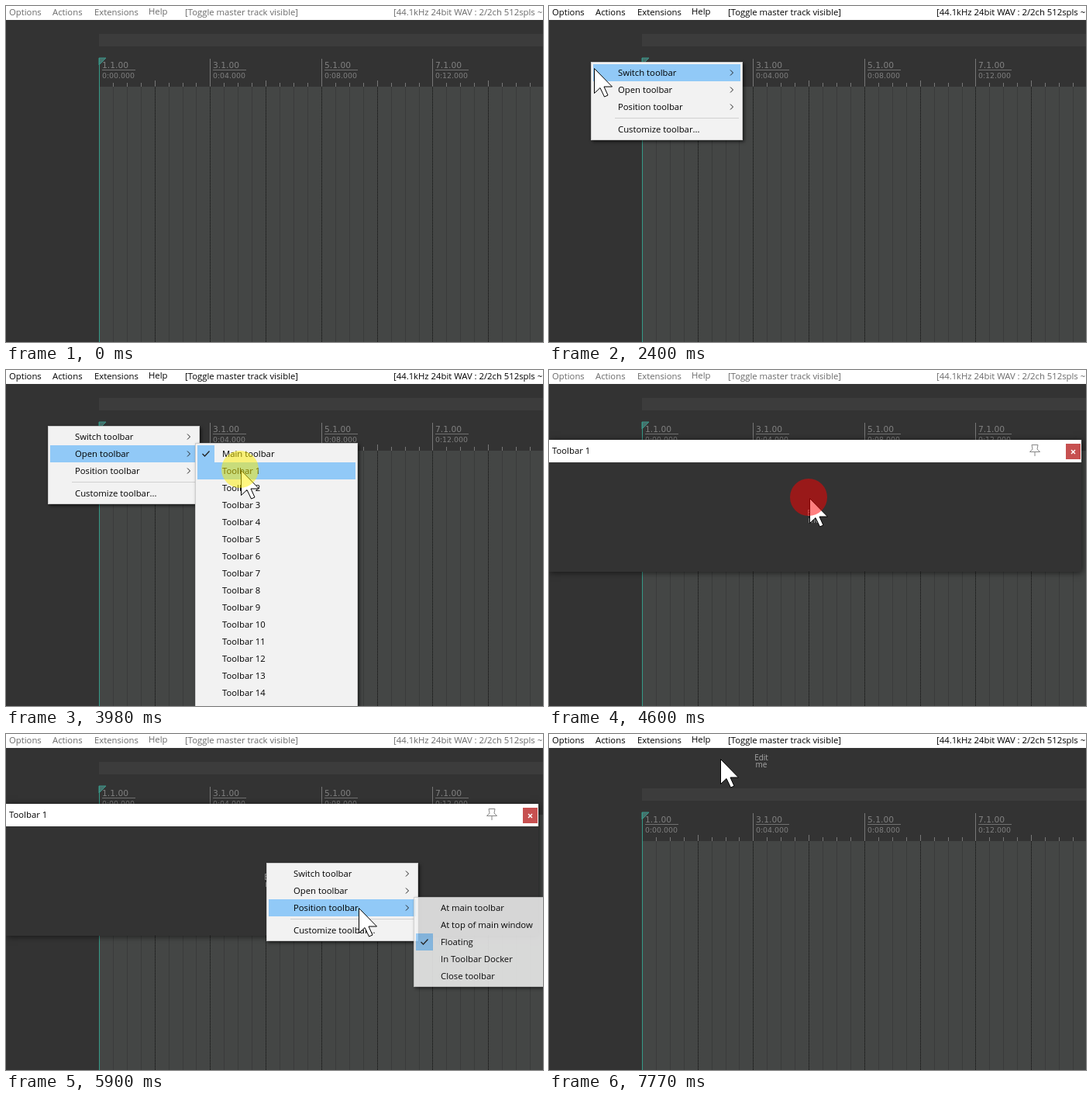
Animation of 693x433 px, one loop 8000 ms. Source, as an HTML page with a canvas:

```html
<!DOCTYPE html>
<html lang="en">
<head>
<meta charset="utf-8">
<title>Toolbar docking</title>
<style>
html, body { margin: 0; width: 100%; height: 100%; overflow: hidden; background: #333; }
canvas { display: block; }
</style>
</head>
<body>
<canvas id="stage" width="693" height="433"></canvas>
<script>
const W = 693, H = 433, LOOP = 8000, STEP = 70;
const layer = Object.assign(document.createElement('canvas'), { width: W, height: H });
let c = document.getElementById('stage').getContext('2d');

const RESTARTS = [0, 190, 1840, 3150, 3980, 4320, 5080, 5760, 7140];

// Pointer moves: start, end, target x, y and an optional curve control point.
const START = [700, 395];
const MOVES = [
  [120, 1380, 55, 73, 356, -165],
  [2260, 2890, 115, 111, 85, 150],
  [3150, 3780, 303, 129],
  [4250, 4600, 336, 165],
  [5060, 5500, 455, 224],
  [5830, 6670, 597, 247],
  [7070, 7770, 221, 32]
];

const RED = 'rgba(255,0,0,.5)', YELLOW = 'rgba(255,240,0,.5)';
const CLICKS = [[1840, 1980, RED], [3980, 4050, YELLOW], [4600, 4740, RED], [6740, 6880, YELLOW]];

const UI_FONT = '"Open Sans", "Noto Sans", sans-serif';
const RULER_FONT = '"DejaVu Sans", sans-serif';

const MAIN_ITEMS = ['Switch toolbar', 'Open toolbar', 'Position toolbar'];
const OPEN_ITEMS = ['Main toolbar', ...Array.from({ length: 16 }, (_, i) => 'Toolbar ' + (i + 1))];
const POSITION_ITEMS = ['At main toolbar', 'At top of main window', 'Floating', 'In Toolbar Docker', 'Close toolbar'];

const ARROW = [[0, 0], [0, 32], [7.5, 25], [13, 36.5], [17.5, 34.5], [12.5, 23.5], [23, 23.5]];

const ease = u => u < .5 ? 4 * u ** 3 : 1 - 4 * (1 - u) ** 3;
const between = (t, a, b) => t >= a && t < b;
const fade = (t, start) => Math.min(1, .28 + (t - start) * .0041);

function rect(x, y, w, h, color) {
  c.fillStyle = color;
  c.fillRect(x, y, w, h);
}

function text(s, x, y, color = '#000', size = 11.3, font = UI_FONT) {
  c.font = size + 'px ' + font;
  c.fillStyle = color;
  c.fillText(s, x, y);
}

function path(points, { fill, stroke, width = 1, close = false }) {
  c.beginPath();
  points.forEach(p => c.lineTo(...p));
  if (close) c.closePath();
  if (fill) { c.fillStyle = fill; c.fill(); }
  if (stroke) { c.strokeStyle = stroke; c.lineWidth = width; c.stroke(); }
}

function shadowed(blur, offset, draw) {
  c.save();
  c.shadowColor = 'rgba(0,0,0,.6)';
  c.shadowBlur = blur;
  c.shadowOffsetX = c.shadowOffsetY = offset;
  draw();
  c.restore();
}

// Draws a group on its own layer, then blends it in as one piece.
function faded(alpha, draw) {
  const under = c;
  c = layer.getContext('2d');
  c.clearRect(0, 0, W, H);
  draw();
  c = under;
  c.globalAlpha = alpha;
  c.drawImage(layer, 0, 0);
  c.globalAlpha = 1;
}

function stepTime(t) {
  const s = RESTARTS.findLast(r => r <= t);
  return s + Math.floor((t - s) / STEP) * STEP;
}

function pointerAt(t) {
  let [x, y] = START;
  for (const [a, b, tx, ty, cx = (x + tx) / 2, cy = (y + ty) / 2] of MOVES) {
    if (t <= a) break;
    const u = ease(Math.min(1, (t - a) / (b - a))), v = 1 - u;
    x = v * v * x + 2 * u * v * cx + u * u * tx;
    y = v * v * y + 2 * u * v * cy + u * u * ty;
  }
  return [Math.round(x), Math.round(y)];
}

function menuBar(t, active) {
  const ink = active ? '#000' : '#6a6a6a';
  rect(0, 0, W, 18, '#fff');
  text('Options', 4, 12, ink);
  text('Actions', 60, 12, ink);
  text('Extensions', 114, 12, ink);
  text('Help', 184, 11, ink);
  text('[Toggle master track visible]', 231, 12, ink);
  if (between(t, 1840, 2260)) text('[audio', 659, 12, ink);
  else text('[44.1kHz 24bit WAV : 2/2ch 512spls ~', 500, 12, ink);
}

function timeline(dy) {
  const top = 104 + dy;
  rect(0, 18, W, H, '#333');
  rect(120, 36 + dy, W, 16, '#3c3c3c');
  rect(120, top, W, H, '#444645');
  for (let beat = 0; beat < 32; beat++) {
    const x = Math.floor(120.4 + beat * 17.94), bar = beat / 4;
    if (beat % 4) {
      rect(x, top, 1, H, '#3a3b3b');
      rect(x, top - 5, 1, 5, '#777');
      continue;
    }
    for (let y = top; y < H; y += 2) rect(x, y, 1, 1, '#0c0c0c');
    const tall = bar % 2 ? 8 : 36;
    rect(x, top - tall, 1, tall, '#777');
    if (bar % 2) continue;
    text(bar + 1 + '.1.00', x + 4, 80 + dy, '#808080', 10.7, RULER_FONT);
    rect(x + 4, 82 + dy, 43, 1, '#707070');
    text('0:' + String(bar * 2).padStart(2, '0') + '.000', x + 4, 93 + dy, '#808080', 9.4, RULER_FONT);
  }
  path([[120, 67 + dy], [129, 67 + dy], [120, 76 + dy]], { fill: '#45706b', stroke: '#3a9488', close: true });
  rect(120, 67 + dy, 1, H, '#359a88');
}

function editMe(x, y) {
  c.textAlign = 'center';
  text('Edit', x, y, '#a8a8a8', 10);
  text('me', x, y + 9, '#a8a8a8', 10);
  c.textAlign = 'left';
}

function floatingWindow() {
  shadowed(8, 1, () => rect(0, 90, 687, 170, '#333'));
  rect(0, 90, 687, 29, '#fff');
  text('Toolbar 1', 4, 108);
  path([[623, 96.5], [631, 96.5], [630, 102], [633.5, 105.5], [620.5, 105.5], [624, 102]],
    { stroke: '#888', close: true });
  path([[627, 106], [627, 111]], { stroke: '#888' });
  rect(667, 95, 19, 20, '#c75050');
  path([[674, 103], [679, 108]], { stroke: '#fff', width: 1.4 });
  path([[679, 103], [674, 108]], { stroke: '#fff', width: 1.4 });
  editMe(342, 188);
}

function menu(x, y, w, h, items, { row, checked, more }) {
  shadowed(4, 2, () => rect(x, y, w, h, '#f2f2f2'));
  c.strokeStyle = '#ccc';
  c.lineWidth = 1;
  c.strokeRect(x + .5, y + .5, w - 1, h - 1);
  items.forEach((label, i) => {
    const ry = y + 3 + i * 22;
    if (i === row) rect(x + 3, ry, w - 6, 22, '#91c9f7');
    if (i === checked) {
      rect(x + 3, ry, 22, 22, '#91c9f7');
      path([[x + 9.5, ry + 11], [x + 12.5, ry + 14], [x + 18.5, ry + 7.5]], { stroke: '#222', width: 1.3 });
    }
    text(label, x + 35, ry + 15);
    if (more) path([[x + 180, ry + 7.5], [x + 183.5, ry + 11], [x + 180, ry + 14.5]], { stroke: '#222' });
  });
  if (more) {
    rect(x + 31, y + 72, 160, 1, '#d0d0d0');
    text('Customize toolbar...', x + 35, y + 91);
  }
}

// Row under the pointer, or -1 outside the list.
function rowAt([px, py], x, y, w, count) {
  const i = Math.floor((py - y - 3) / 22);
  return px > x + 3 && px < x + w - 3 && i >= 0 && i < count ? i : -1;
}

function contextMenu(t, pointer, x, y, opened, subOpened, parent, sub) {
  if (t < opened) return;
  const expanded = t >= subOpened;
  const row = expanded ? parent : rowAt(pointer, x, y, 196, MAIN_ITEMS.length);
  faded(fade(t, opened), () => menu(x, y, 196, 101, MAIN_ITEMS, { row, more: true }));
  if (!expanded) return;
  const { items, checked } = sub;
  const subRow = rowAt(pointer, sub.x, sub.y, sub.w, items.length);
  faded(fade(t, subOpened), () =>
    menu(sub.x, sub.y, sub.w, items.length * 22 + 6, items, { row: subRow, checked }));
}

function drawPointer(t, [x, y]) {
  path(ARROW.map(([ax, ay]) => [x + ax + .5, y + ay + .5]), { fill: '#fff', stroke: '#000', close: true });
  const click = CLICKS.find(([a, b]) => between(t, a, b));
  if (!click) return;
  c.fillStyle = click[2];
  c.beginPath();
  c.arc(x - 1, y - 1, 24, 0, 7);
  c.fill();
}

function draw(t) {
  const docked = t >= 6880, floating = between(t, 4050, 6880);
  const pointer = pointerAt(t);
  timeline(docked ? 34 : 0);
  menuBar(t, between(t, 1840, 4050) || docked);
  if (docked) editMe(274, 34);
  if (floating) {
    floatingWindow();
    contextMenu(t, pointer, 336, 166, 4740, 5760, 2,
      { x: 526, y: 210, w: 200, items: POSITION_ITEMS, checked: 2 });
  } else if (!docked) {
    contextMenu(t, pointer, 54, 72, 1980, 3150, 1,
      { x: 244, y: 94, w: 210, items: OPEN_ITEMS, checked: 0 });
  }
  if (t >= 190) drawPointer(t, pointer);
}

function tick() {
  draw(stepTime(performance.now() % LOOP));
  requestAnimationFrame(tick);
}
tick();
</script>
</body>
</html>
```
